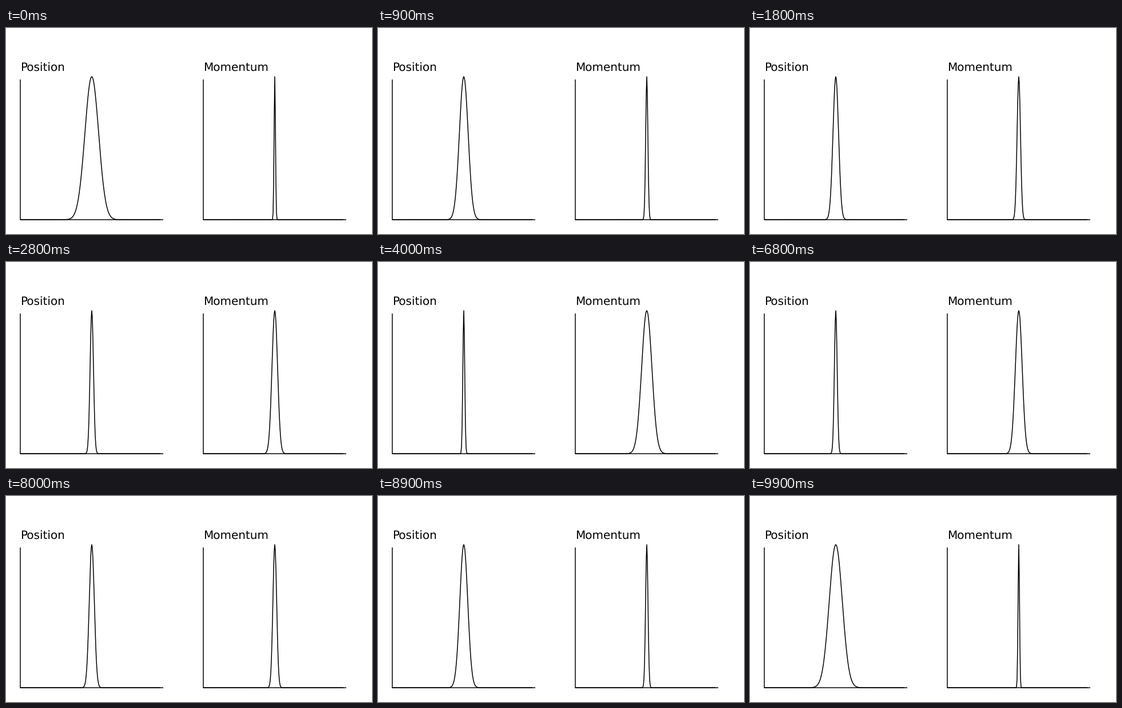
A matplotlib script for the animation above (10000 ms loop, 640 by 360 pixels).

```python
import matplotlib.pyplot as plt
import numpy as np
from matplotlib.animation import FuncAnimation

W, H = 640, 360
FRAMES, INTERVAL = 100, 100
PX = 0.72  # points per pixel at 100 dpi

BASE, HEIGHT = 335, 250
X_WIDTH = 12.0   # widest position spread, px
P_WIDTH = 14.7   # widest momentum spread, px
RATE = 0.05      # log change of the spread per frame

plt.rcParams["font.family"] = "DejaVu Sans"
plt.rcParams["text.hinting"] = "none"

fig = plt.figure(figsize=(W / 100, H / 100), dpi=100, facecolor="white")
ax = fig.add_axes([0, 0, 1, 1])
ax.set_xlim(0, W)
ax.set_ylim(H, 0)
ax.axis("off")

STROKE = dict(color="black", lw=1.5 * PX, snap=False, solid_capstyle="butt")
offset = np.arange(-125, 121)


def panel(left, title):
    """Draw the axes and title; return the empty curve."""
    ax.plot([left, left, left + 250], [90, BASE, BASE],
            solid_joinstyle="miter", **STROKE)
    ax.text(left, 75, title, fontsize=20 * PX, color="black",
            ha="left", va="baseline")
    curve, = ax.plot([], [], solid_joinstyle="round", **STROKE)
    return curve


def set_bell(curve, left, sigma):
    y = BASE - HEIGHT * np.exp(-offset**2 / (2 * sigma**2))
    curve.set_data(left + 125 + offset, y)


position = panel(25, "Position")
momentum = panel(345, "Momentum")


def update(i):
    half = FRAMES // 2
    step = half - abs(half - i % FRAMES)
    set_bell(position, 25, X_WIDTH * np.exp(-RATE * step))
    set_bell(momentum, 345, P_WIDTH * np.exp(-RATE * (half - step)))
    return position, momentum


anim = FuncAnimation(fig, update, frames=FRAMES, interval=INTERVAL,
                     repeat=True, repeat_delay=0, blit=False)
plt.show()
```
